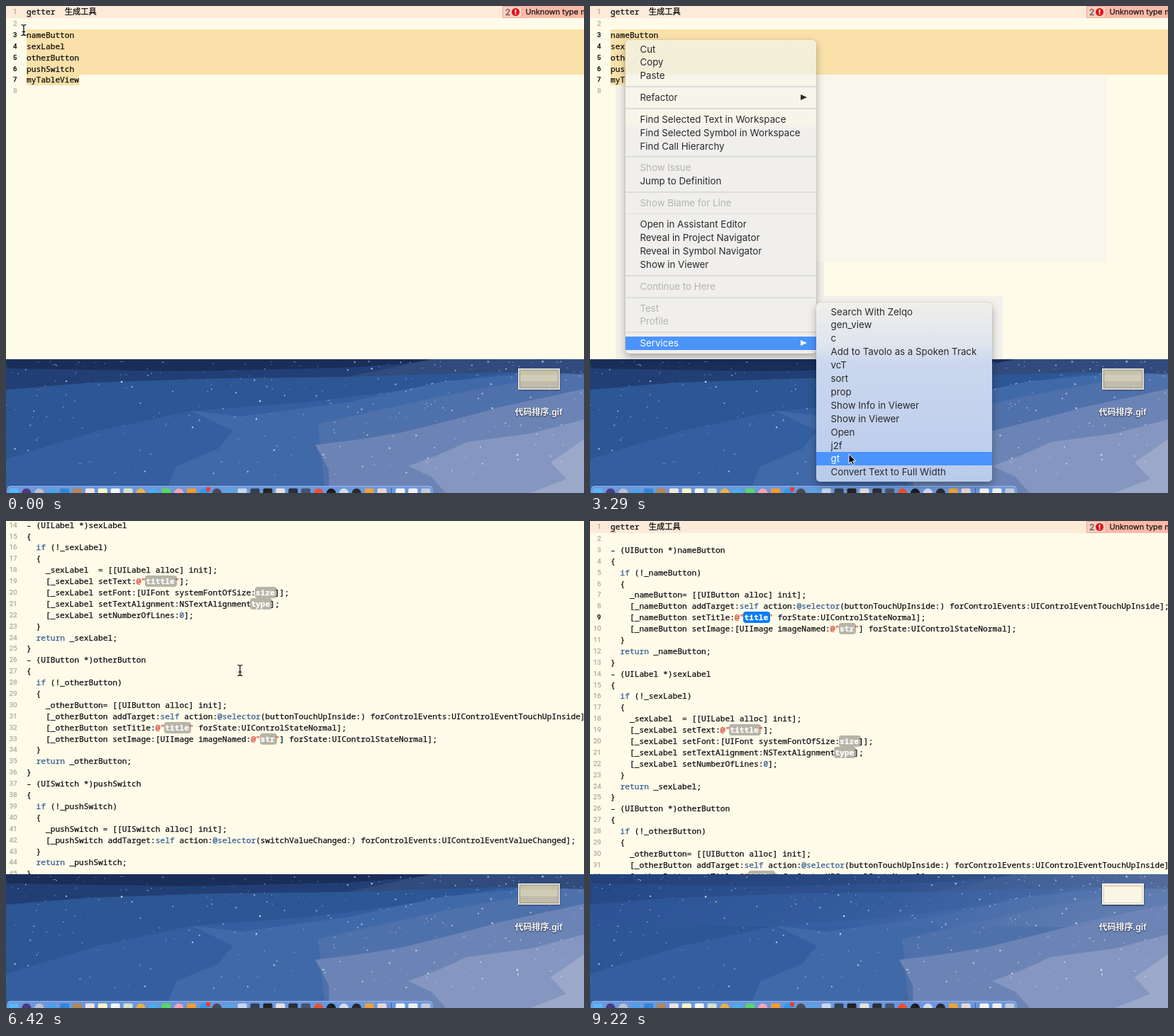
Recreate the animation shown at these times as an HTML page. Size 815 by 688 pixels, loop 9320 ms.

```html
<!DOCTYPE html>
<html lang="en">
<head>
<meta charset="utf-8">
<title>Getter generator</title>
<style>
html, body { margin: 0; width: 100%; height: 100%; overflow: hidden; }
#stage { position: relative; width: 815px; height: 688px; overflow: hidden; }
#stage > *, .haze, .doc { position: absolute; }

#editor { left: 0; top: 0; width: 815px; height: 499px; overflow: hidden; background: #fffbe9; }
#scroll { position: absolute; left: 0; top: 1.1px; width: 815px; }
.doc { left: 0; top: 0; z-index: 0; width: 815px; }
.line {
  position: relative; height: 15.9px; padding-left: 29px; white-space: pre; color: #0c0c0e;
  font: 500 11.23px/15.9px "Noto Sans Mono", "Noto Sans CJK SC", "Noto Sans CJK", monospace;
  -webkit-text-stroke: .25px;
}
.num {
  position: absolute; left: 0; width: 15.5px; text-align: right; color: #a9a79b;
  font: 400 9.5px/15.9px Roboto, sans-serif;
}
.current .num { color: #111; font-weight: 500; }
.line:first-child { top: -1px; }
.line:first-child::before {
  content: ""; position: absolute; z-index: -1; left: 0; top: -21px; width: 815px; height: 38px; background: #fdebda;
}
.picked::before, .picked-end::before {
  content: ""; position: absolute; z-index: -1; left: 29px; right: 0; top: 0; height: 16px; background: #fae1aa;
}
.picked-end::before { right: auto; width: 74px; }
i { font-style: normal; }
.oops { border-bottom: 1.5px dotted #e02a1a; }
.key { color: #33598f; }
.str { color: #d8392a; position: relative; }
.note { color: #65738f; }
.token {
  display: inline-block; height: 16px; margin: 0 -3px 0 -1px; padding: 0 3px 0 1px;
  border-radius: 4px; background: #b6b5a7; color: #fff; font-weight: 600; vertical-align: top;
}
.token.active { background: #067cff; }
.issue {
  position: absolute; left: 728px; top: 0; width: 120px; height: 17px; padding-left: 4.5px; background: #fdb9a8;
  color: #191615; font: 400 10.9px/16.5px Inter, sans-serif;
}
.badge {
  position: absolute; left: 700px; top: 0; width: 26px; height: 15px; border: 1px solid #eda594;
  background: #fad0c2; color: #705a54; font: 500 12px/15.5px Inter, sans-serif; text-indent: 3px;
}
.badge i {
  position: absolute; left: 12px; top: 2px; width: 11px; height: 11px; border-radius: 50%; background: #df1414;
  color: #fff; font: 700 9px/11px Inter, sans-serif; text-align: center; text-indent: 0;
}

.menu {
  box-sizing: border-box; padding: 3.6px 0; border-radius: 5px; color: #2a2a2b;
  box-shadow: 0 0 1px rgba(0,0,0,.45), 0 5px 12px rgba(0,0,0,.3);
  font: 400 13.3px/18.9px Inter, sans-serif; white-space: nowrap; overflow: hidden;
}
.menu div { position: relative; height: 18.9px; padding-left: 20.5px; }
.menu hr { height: 1.8px; margin: 5px 0; border: 0; background: #dcdcd8; }
.menu .off { color: #b4b4b2; }
.menu .more::after {
  content: ""; position: absolute; left: 247px; top: 5px;
  border: solid transparent; border-width: 4.5px 0 4.5px 9px; border-left-color: currentColor;
}
#main {
  left: 50px; top: 48px; width: 269px; height: 443px;
  background: linear-gradient(#f4efd9 0, #f1eed8 45px, #f7f5ea 52px, #f7f5ea 118px, #f0efed 126px);
}
#services {
  left: 319px; top: 419px; width: 248px; height: 253px;
  background: linear-gradient(#f0efea, #dfe5ee 60px, #cbd7ee 85px, #b9cbeb);
}

#desktop { left: 0; top: 499px; }
.thumb {
  left: 722px; top: 512px; width: 55px; height: 26px; border: 2px solid #dddcd2;
  background: linear-gradient(#c7c3a9 0 7px, #cfccb7 7px 16px, #bfbda9 16px);
  box-shadow: 0 1px 2px rgba(0,0,0,.4), inset 0 0 0 1px #989787;
}
#bright {
  border-color: #f4f2ea; background: linear-gradient(#f3ddc9 0 3px, #faf6e5 3px);
  box-shadow: 0 1px 2px rgba(0,0,0,.4), inset 0 0 0 1px #d7d2bf;
}
#file {
  left: 691px; top: 566px; width: 120px; text-align: center; color: #fff;
  font: 600 12px/16px Inter, "Noto Sans CJK SC", "Noto Sans CJK", sans-serif;
  text-shadow: 0 1px 2px rgba(0,0,0,.75);
}
#cursor { left: 0; top: 0; overflow: visible; }
</style>
</head>
<body>
<div id="stage">
  <div id="editor">
    <div id="scroll">
      <div class="doc" id="before"></div>
      <div class="doc" id="after"></div>
    </div>
  </div>

  <svg id="desktop" width="815" height="189" viewBox="0 499 815 189">
    <defs>
      <linearGradient id="sky" x2="1" y2=".12">
        <stop stop-color="#294f95"/>
        <stop offset=".55" stop-color="#3b63a6"/>
        <stop offset="1" stop-color="#6f87b7"/>
      </linearGradient>
    </defs>
    <path fill="#2c5694" d="M0 499H815V688H0Z"/>
    <path fill="#335fa0" d="M0 640L130 600 262 572 420 560 540 545 690 520 815 510V688H0Z"/>
    <path fill="#4069a8" d="M225 688L240 650 300 625 320 600 262 572 330 580 480 560 620 530 815 512V688Z"/>
    <path fill="#4f71ab" d="M440 590L620 550 815 514V688H450Z"/>
    <path fill="#213f75" d="M0 499H815V502L640 516 480 524 300 526 120 532 0 542Z"/>
    <path fill="#1a2e5a" d="M0 499H640L480 511 250 516 0 512Z"/>
    <path fill="#304b7c" d="M600 499H815V520L700 517 480 524Z"/>
    <path fill="#6c84b5" d="M436 620L500 612 560 602 640 582 700 566 815 541V688H456L455 655Z"/>
    <path fill="#8597c0" d="M567 650L610 634 650 616 740 604 815 584V688H620L600 665Z"/>
    <path fill="#9ba8c9" d="M768 645L815 612V688H740L790 668Z"/>
    <rect id="glow" y="499" width="815" height="74" fill="url(#sky)"/>
    <g id="stars" fill="#e6eefa"></g>
    <rect x="2" y="678.5" width="599" height="20" rx="4" fill="#6b97de" stroke="#a9c4ee" stroke-width=".8"/>
    <g id="dock"></g>
    <path stroke="#3d5f9b" d="M543.5 681V688"/>
    <circle cx="285" cy="683" r="3.2" fill="#ee3b34"/>
  </svg>
  <div class="thumb"></div>
  <div class="thumb" id="bright"></div>
  <div id="file">代码排序.gif</div>

  <div id="main" class="menu"></div>
  <div id="services" class="menu"></div>

  <svg id="cursor" width="1" height="1">
    <path id="beam" fill="none" stroke="#111" stroke-width="1.3" stroke-linecap="round"
      d="M-3 -7.4Q0 -7.4 0 -5.5V5.5Q0 7.4 -3 7.4M3 -7.4Q0 -7.4 0 -5.5M0 5.5Q0 7.4 3 7.4M-1.8 2.4H1.8"/>
    <path id="arrow" stroke="#fff" d="M0 0V13.5L3.2 10.6 5.4 15.6 7.6 14.7 5.5 9.8H9.8Z"/>
  </svg>
</div>

<script>
const LOOP = 9320;
const $ = id => document.getElementById(id);

// Hold each value of a property until the next listed time.
function play(el, prop, steps) {
  const frames = steps.map(([t, v]) => ({ offset: t / LOOP, [prop]: v, easing: 'step-end' }));
  frames.push({ offset: 1, [prop]: steps.at(-1)[1] });
  el.animate(frames, { duration: LOOP, iterations: Infinity });
}
function show(el, from, to) {
  const steps = [[from, 1]];
  if (from > 0) steps.unshift([0, 0]);
  if (to < LOOP) steps.push([to, 0]);
  play(el, 'opacity', steps);
}

// Editor text
const head = ['getter  生成工具', ''];
const getter = (type, name, body) => [
  `– (${type} *)${name}`, '{', `  if (!_${name})`, '  {',
  ...body.map(s => s && '    ' + s), '  }', `  return _${name};`, '}'];
const send = (name, message) => `[_${name} ${message}];`;
const button = name => getter('UIButton', name, [
  `_${name}= [[UIButton alloc] init];`,
  send(name, 'addTarget:self action:@selector(buttonTouchUpInside:) forControlEvents:UIControlEventTouchUpInside'),
  send(name, 'setTitle:@"<#title#>" forState:UIControlStateNormal'),
  send(name, 'setImage:[UIImage imageNamed:@"<#str#>"] forState:UIControlStateNormal')]);

const names = [...head, 'nameButton', 'sexLabel', 'otherButton', 'pushSwitch', 'myTableView', ''];
const code = [
  ...head,
  ...button('nameButton'),
  ...getter('UILabel', 'sexLabel', [
    '_sexLabel  = [[UILabel alloc] init];',
    send('sexLabel', 'setText:@"<#tittle#>"'),
    send('sexLabel', 'setFont:[UIFont systemFontOfSize:<#size#>]'),
    send('sexLabel', 'setTextAlignment:NSTextAlignment<#type#>'),
    send('sexLabel', 'setNumberOfLines:0')]),
  ...button('otherButton'),
  ...getter('UISwitch', 'pushSwitch', [
    '_pushSwitch = [[UISwitch alloc] init];',
    send('pushSwitch', 'addTarget:self action:@selector(switchValueChanged:) forControlEvents:UIControlEventValueChanged')]),
  '#pragma mark – # Getter',
  ...getter('NSMutableArray', 'data', ['_data = [[NSMutableArray alloc] init];']),
  '',
  ...getter('UITableView', 'myTableView', [
    '_myTableView = [[UITableView alloc] init];',
    send('myTableView', 'setDelegate:self'),
    send('myTableView', 'setDataSource:self'),
    send('myTableView', 'setSeparatorStyle:UITableViewCellSeparatorStyleSingleNone'),
    '']),
  ''];

const wrap = (kind, text) => `<i class="${kind}">${text}</i>`;
const paint = text => text.replace(
  /<#(\w+)#>|(@?")|(^#pragma.*)|^(g)(?=etter)|@selector|\b(?:if|return|self|0)\b/g,
  (all, token, quote, note, typo) =>
    token ? wrap('token', token) : quote ? wrap('str', quote) :
    note ? wrap('note', note) : typo ? wrap('oops', typo) : wrap('key', all));

const issue = '<div class="badge">2<i>!</i></div><div class="issue">Unknown type name</div>';
function fill(doc, lines, mark) {
  doc.innerHTML = lines.map((text, i) =>
    `<div class="line ${mark(i + 1)}"><span class="num">${i + 1}</span>${paint(text)}${i ? '' : issue}</div>`).join('');
}
fill($('before'), names, n => n < 3 || n > 7 ? '' : n < 7 ? 'current picked' : 'current picked-end');
fill($('after'), code, n => n === 9 ? 'current' : '');
$('after').querySelector('.token').classList.add('active');
show($('before'), 0, 4780);
show($('after'), 4780, LOOP);

play($('scroll'), 'transform', [
  [0, 0], [5680, 8], [5830, 4], [5980, 1], [6130, -45], [6280, -210], [6430, -400], [6570, -520],
  [6720, -572], [6860, -583.4], [7010, -550], [7160, -330], [7310, -110], [7460, 8], [7610, 2], [7760, 0]
].map(([t, y]) => [t, `translateY(${y}px)`]));

// Faint patches left around the open menus
function haze(x, y, right, bottom, color, from, to) {
  const el = document.createElement('div');
  el.className = 'haze';
  el.style.cssText = `left:${x}px;top:${y}px;width:${right - x}px;height:${bottom - y}px;background:${color}`;
  $('editor').append(el);
  show(el, from, to);
}
haze(36, 113, 330, 499, '#f3f1eb', 890, 4190);
haze(319, 97, 581, 362, '#f9f6ec', 1940, 4480);
haze(581, 97, 729, 362, '#f9f6ec', 1940, 4780);
haze(306, 409, 582, 499, '#f2f1ec', 1940, 4190);

// Menus: "-" separator, "~" disabled, ">" has a submenu
const list = (el, items) => el.innerHTML = items.split('|').map(s =>
  s === '-' ? '<hr>' :
  `<div class="${{ '~': 'off', '>': 'more' }[s[0]] || ''}">${s.replace(/^[~>]/, '')}</div>`).join('');
list($('main'), 'Cut|Copy|Paste|-|>Refactor|-|Find Selected Text in Workspace|Find Selected Symbol in Workspace|' +
  'Find Call Hierarchy|-|~Show Issue|Jump to Definition|-|~Show Blame for Line|-|Open in Assistant Editor|' +
  'Reveal in Project Navigator|Reveal in Symbol Navigator|Show in Viewer|-|~Continue to Here|-|~Test|~Profile|-|>Services');
list($('services'), 'Search With Zelqo|gen_view|c|Add to Tavolo as a Spoken Track|vcT|sort|prop|' +
  'Show Info in Viewer|Show in Viewer|Open|j2f|gt|Convert Text to Full Width');
show($('main'), 890, 4040);
show($('services'), 1940, 4040);

// Pointer: time, x, y, shape
const path = [
  [0, 25, 34, 'beam'], [140, 32, 40, 'beam'], [290, 43, 50, 'beam'], [440, 49, 54, 'beam'],
  [1340, 62, 100, 'arrow'], [1490, 92, 230, 'arrow'], [1640, 128, 355, 'arrow'], [1790, 155, 470, 'arrow'],
  [1940, 161, 468, 'arrow'], [2090, 245, 470, 'arrow'], [2240, 335, 452, 'arrow'], [2390, 346, 500, 'arrow'],
  [2540, 353, 560, 'arrow'], [2690, 358, 603, 'arrow'], [2990, 361, 616, 'arrow'], [3140, 363, 626, 'arrow'],
  [3290, 365, 633, 'arrow'], [3590, 364, 632, 'arrow'], [4040, 364, 610, 'arrow'], [4190, 365, 520, 'arrow'],
  [4340, 366, 400, 'beam'], [4480, 366, 300, 'beam'], [4630, 366, 259, 'beam'], [5080, 343, 229, 'beam'],
  [5230, 330, 211, 'beam'], [7460, 365, 202, 'beam'], [7610, 405, 190, 'beam'], [7760, 411, 189, 'beam'],
  [7910, 500, 260, 'beam'], [8060, 710, 540, 'arrow'], [8210, 795, 659, 'arrow'], [8500, 795, 659, 'none']];
play($('cursor'), 'transform', path.map(([t, x, y]) => [t, `translate(${x}px,${y}px)`]));
for (const kind of ['beam', 'arrow'])
  play($(kind), 'opacity', path.map(([t, , , k]) => [t, k === kind ? 1 : 0]));

function light(row, steps) {
  play(row, 'backgroundColor', steps.map(([t, on]) => [t, on ? '#4b94fd' : 'transparent']));
  play(row, 'color', steps.map(([t, on]) => [t, on ? '#fff' : '#2a2a2b']));
}
function hover(menu, from, to) {
  const moves = path.filter(([t]) => t >= from && t < to);
  for (const row of menu.querySelectorAll('div:not(.off)')) {
    const top = menu.offsetTop + row.offsetTop;
    light(row, [[0, false], ...moves.map(([t, , y]) => [t, y >= top && y < top + 18.9]), [to, false]]);
  }
}
hover($('main'), 1340, 1790);
light($('main').lastElementChild, [[0, false], [1790, true], [4040, false]]);
hover($('services'), 2240, 4040);

// Desktop
let seed = 7;
const random = () => (seed = seed * 16807 % 2147483647) / 2147483647;
$('stars').innerHTML = Array.from({ length: 300 }, () => {
  const x = random() * 815, y = 501 + 165 * random() ** 1.5, size = 1 + random() ** 3 * 1.4;
  return `<rect x="${x}" y="${y}" width="${size}" height="${size}" opacity="${.25 + random() * .6}"/>`;
}).join('');

// Dock icons; "o" marks a round one
const icons = ('#59b8f5 #4a3b7co #b9c2cco #4aa3e8o #2f86d8 #b0875a #f0e4e2 #fbf3c6 #f4f4f4 #d5e3cb #e8b24bo #45b1eao ' +
  '#5bd568 #f7a3b9o #f59b2f #2b9cf0o #444c58o #5aa3e0 #c7d6ec #33404f #222 #e6e1da #2b2f36 #46546a #e8502fo #1d1f24o ' +
  '#d6dce5o #2a2a2co #e9a33b #e8d6d2 #f5f5f5 #f0f0f0 #c3cbd6').split(' ');
$('dock').innerHTML = icons.map((icon, i) => {
  const x = 11 + i * 17.9 + (i > 29 ? 8 : 0);
  return `<rect x="${x - 6.5}" y="681.5" width="13" height="13" rx="${icon.endsWith('o') ? 6.5 : 2}" fill="${icon.replace('o', '')}"/>`;
}).join('');

play($('glow'), 'opacity', [[0, 0], [9220, .55]]);
show($('bright'), 9220, LOOP);
</script>
</body>
</html>
```
